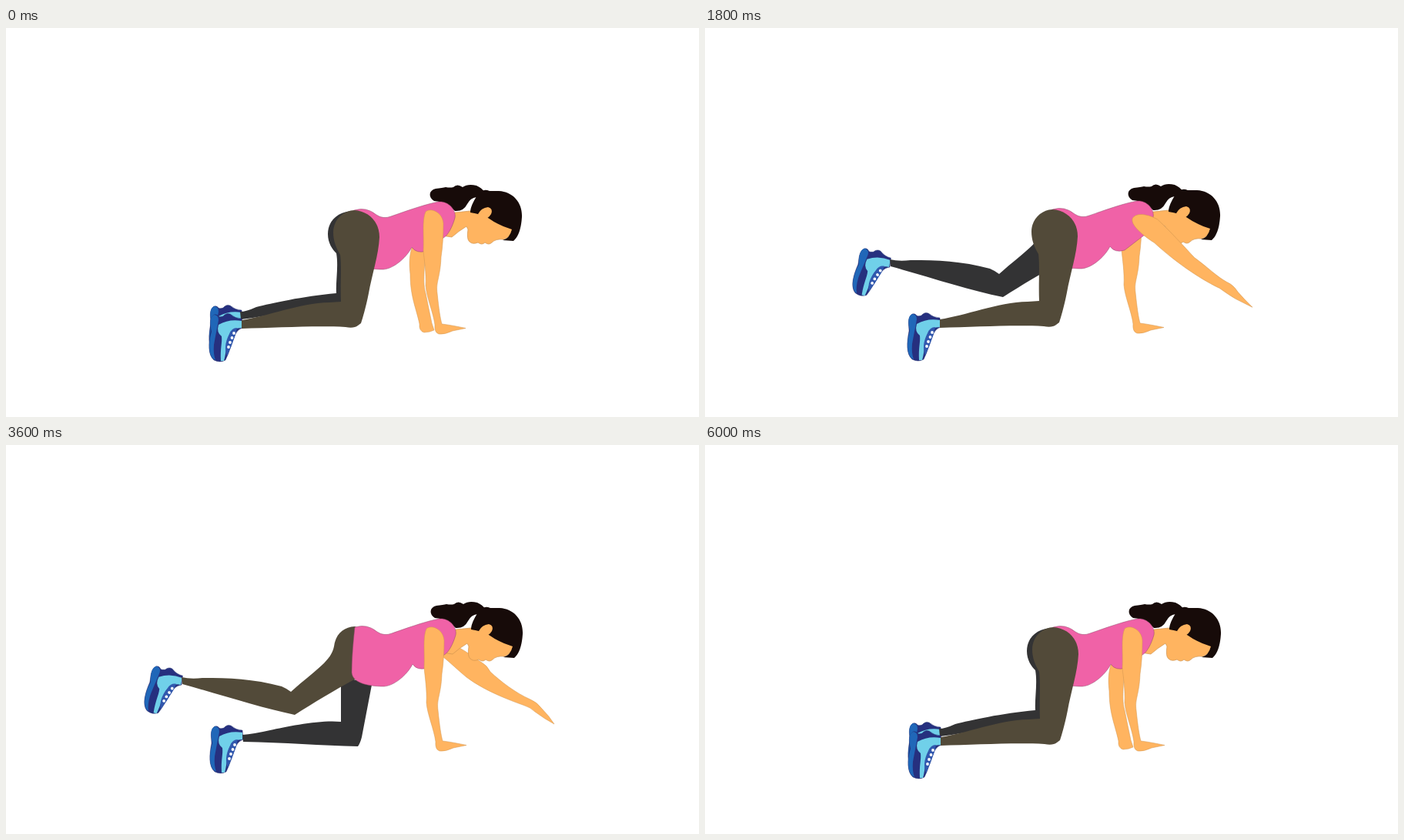
These frames come from a looping animation (900x506 px, 6.8 s). An HTML page:

```html
<!DOCTYPE html>
<html lang="en">
<head>
<meta charset="utf-8">
<title>Bird dog exercise</title>
<style>
  html, body { margin: 0; width: 100%; height: 100%; overflow: hidden; background: #fff; }
  svg { display: block; width: 100%; height: 100%; }
</style>
</head>
<body>
<svg id="stage" viewBox="0 0 900 506"></svg>
<script>
const OLIVE = '#524a39', DARK = '#333334', SKIN = '#ffb460', PINK = '#f062a7', HAIR = '#170b09';
const SKIN_EDGE = '#d0944f';

const legs = {
  kneel: 'M452 237C471 238 485 252 485 272C484 295 475 322 471 345C467 365 463 378 461 384L457 387Q452 391 441 389C400 387 350 390 306 391L306 380C340 375 380 358 420 357L435 356C434 335 436 310 434 295C428 285 425 276 425 266C425 250 437 238 452 237Z',
  tucked: 'M452 238C432 238 418 250 418 268C418 280 424 288 429 293C432 310 428 330 429 345C385 349 345 358 325 363Q312 369 304 369L305 379C350 374 400 360 435 357L460 270Z',
  farKneel: 'M434 300L434 360C409 357 364 366 342 371Q320 376 306 377L307 386C360 387 409 391 456 392Q459 388 461 380L474 312Z',
  mid: 'M452 236C437 237 427 246 425 262C421 281 404 290 369 321Q364 317 357 314C320 304 289 303 254 303Q239 305 227 302L228 311C279 325 330 342 374 351C399 335 424 320 453 304L462 240Z',
  back: 'M453 238C438 239 430 246 424 258C414 264 390 268 354 281Q347 285 336 280C321 277 296 281 266 286Q226 293 204 295L205 306C251 305 301 309 355 310C381 307 411 304 438 302L458 303L464 243Z'
};

const arms = {
  stand: 'M545 239C552 233 567 240 568 254C568 270 567 285 565 298C564 325 558 330 560 345C562 365 564 378 566 385C575 386 585 388 597 390.5L580 394Q570 399 562 398Q556 396 557 386C555 370 546 350 545 335C546 320 543 300 542 290C543 270 540 250 545 239Z',
  tucked: 'M527 286C523 300 524 310 525 320C525 350 533 365 537 385Q536 394 543 396Q550 396 556 393L553 384Q549 365 545 345C542 335 543 325 543 318L545 286Z',
  reach: 'M583 239C566 241 555 249 556 257C559 266 581 267 598 266C641 271 681 268 701 264Q716 264 726 263L750 259Q736 257 723 254Q713 250 704 252C691 254 671 251 651 251C631 247 601 241 583 239Z',
  lowReach: 'M566 262L584 262C595 267 606 276 617 283Q623 286 628 295C642 308 660 322 680 331Q688 334 695 343Q704 352 711 363Q698 356 686 347Q680 341 670 338C650 331 632 323 619 316Q606 309 597 302C586 293 577 284 566 275Z'
};

const path = (d, fill, edge = 'none', w = .7) =>
  `<path d="${d}" fill="${fill}" stroke="${edge}" stroke-width="${w}" stroke-linejoin="round"/>`;
const group = (body, x = 0, y = 0, turn = 0, cx = 0, cy = 0) =>
  `<g transform="translate(${x} ${y}) rotate(${turn} ${cx} ${cy})">${body}</g>`;

const laces = [[296, 397], [293.5, 403], [291, 409], [289, 415]]
  .map(([x, y]) => `<circle cx="${x}" cy="${y}" r="1.9" fill="#fff"/>`).join('');

const shoe =
  path('M270 373C263 378 266 388 266 395C263 410 262 425 270 432Q278 436 285 432C290 422 293 410 298 398Q301 392 307 390L306 378Q298 378 291 372Q286 370 282 375Q276 377 275 374Q273 372 270 373Z', '#26307f', '#1b2a69', .4) +
  path('M270 373Q276 373 276 380C274 392 272 400 270 412Q269 424 272 432C262 428 263 408 267 395C265 385 264 376 270 373Z', '#2067b8') +
  path('M276 386Q290 378 306 381L306 390Q295 390 290 399C285 408 287 420 283 433L279 433C278 416 281 410 280 401Q273 396 276 386Z', '#70d0e9') +
  path('M300 390Q293 390 290 398C284 410 284 418 287 427Q293 414 298 399Z', '#3158ae') + laces;

const torso = path('M452 237Q468 232 481 243Q490 249 500 245C520 238 545 229 562 226C576 225 585 238 583 247C580 258 574 270 568 273L546 290Q533 294 527 285C522 296 505 313 490 314C468 314 449 309 448 296C448 278 450 255 452 237Z', PINK, '#8e4668', .5);

const head =
  path('M583 240L603 238L622 238C632 248 645 256 658 261Q655 273 646 275Q636 274 631 279Q627 283 622 279Q618 283 613 279Q606 282 602 278Q598 275 600 262L598 258Q588 264 579 272L566 270Z', SKIN, SKIN_EDGE) +
  path('M583 238C575 230 568 226 556 225C548 220 549 211 558 209Q567 208 571 207Q577 208 581 207Q586 202 593 207Q600 202 611 205Q618 208 621 213L611 220Q603 221 599 229Q594 239 583 238Z', HAIR) +
  path('M603 240C603 233 607 226 611 219L618 213Q621 209 628 212L640 212C659 213 671 228 670 246C669 262 665 272 659 277L645 276Q654 274 657 262Q640 257 626 247Q617 242 603 240Z', HAIR) +
  path('M613 242Q617 234 626 233Q633 235 630 242Q626 249 618 249Z', SKIN);

const leg = (kind, color, x = 0) => {
  const [sx, sy, turn] = {
    kneel: [0, 0, 0], tucked: [0, -11, 0], farKneel: [0, -7, 0],
    mid: [-79, -78, 12], back: [-102, -86, 0]
  }[kind];
  return group(group(shoe, sx, sy, turn, 306, 385) + path(legs[kind], color), x);
};
const arm = (kind, turn = 0) => group(path(arms[kind], SKIN, SKIN_EDGE, .5), 0, 0, turn, 569, 253);

// Layers run from the far side to the near side.
const pose = (shift, farLeg, farArm, nearBody, nearArm) =>
  group(farLeg + farArm + head + nearBody + nearArm, ...shift);

const nearKneel = torso + leg('kneel', OLIVE);
const left = [-1, -1], right = [1, 0];
const poses = {
  rest: pose([0, 0], leg('tucked', DARK), arm('tucked'), nearKneel, arm('stand')),
  nearMid: pose(left, leg('mid', DARK, 14), arm('stand'), nearKneel, arm('reach', 36)),
  nearOut: pose(left, leg('back', DARK), arm('stand'), nearKneel, arm('reach')),
  farMid: pose(right, leg('farKneel', DARK), arm('lowReach'), leg('mid', OLIVE) + torso, arm('stand')),
  farOut: pose(right, leg('farKneel', DARK), arm('reach'), leg('back', OLIVE, 2) + torso, arm('stand'))
};

const LOOP = 6800;
const steps = [
  [0, 'rest'], [600, 'nearMid'], [1200, 'nearOut'], [1800, 'nearMid'], [2800, 'rest'],
  [3600, 'farMid'], [4400, 'farOut'], [5200, 'farMid'], [6000, 'rest']
];

const stage = document.getElementById('stage');
const start = performance.now();
let shown;

function draw(now) {
  const t = Math.max(0, now - start) % LOOP;
  const name = steps.filter(([at]) => at <= t).pop()[1];
  if (name !== shown) stage.innerHTML = poses[shown = name];
  requestAnimationFrame(draw);
}
draw(start);
</script>
</body>
</html>
```
